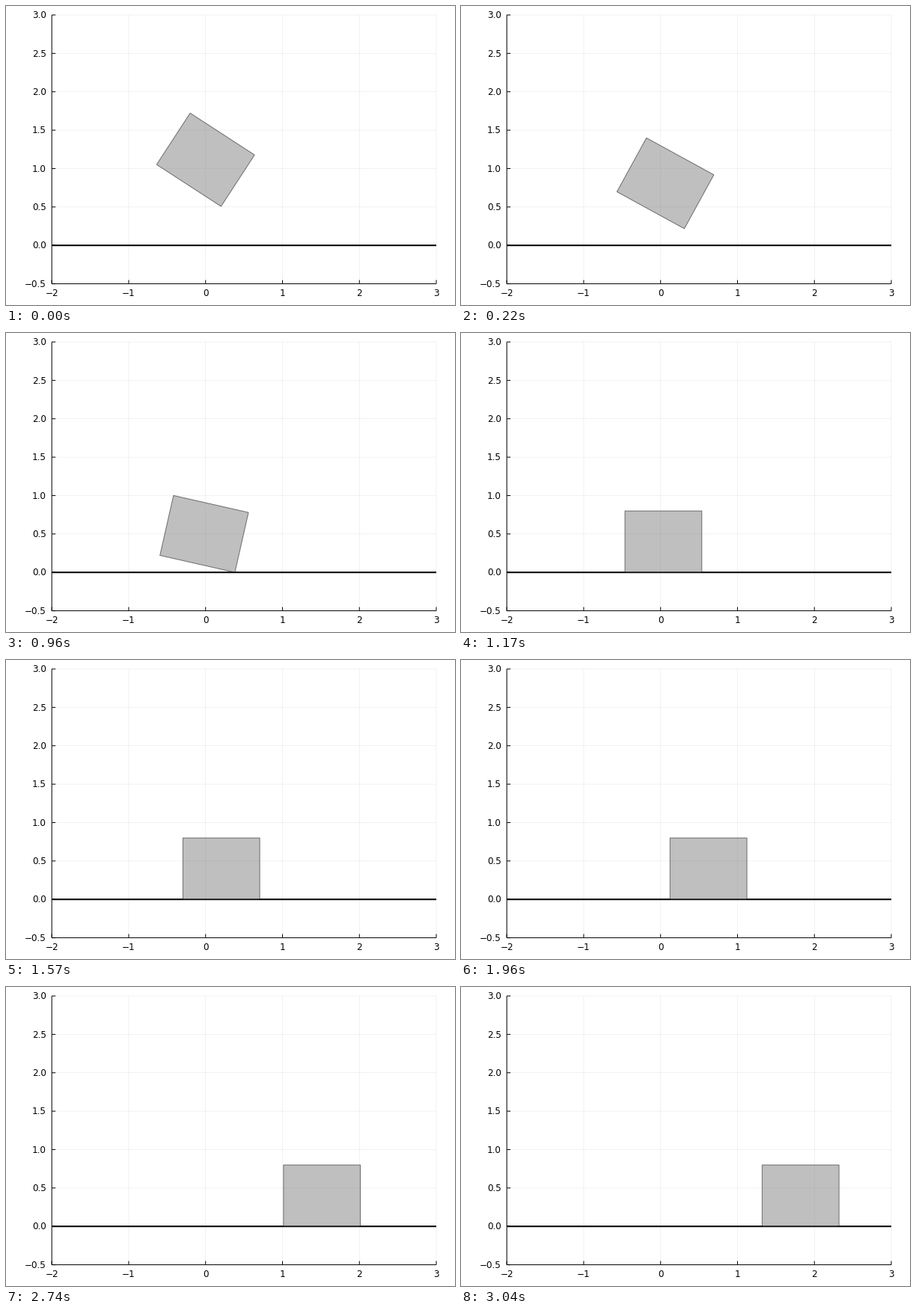
Write a matplotlib script that moves like this. It is 600 by 400 pixels and loops after 3080 ms.

```python
import numpy as np
import matplotlib.pyplot as plt
from matplotlib.animation import FuncAnimation

STAGE_W, STAGE_H, DPI = 600, 400, 100
LEFT, RIGHT, TOP, BOTTOM = 61.2, 575.0, 12.0, 371.6
TICK_MS, LOOP_TICKS = 10, 308
POSES, FPS = 71, 23
PX = 72 / DPI  # one pixel in points

BOX_W, BOX_H = 1.0, 0.8
START_Y, GRAVITY, STEP = 1.115, 9.81, 0.05
START_TILT, IMPACT_TILT, SLIP_TILT = 33.05, 27.0, 15.8
IMPACT, PIVOT, SLIP, REST, FLAT, SLIDE = 7, 8, 14, 16, 26.4, 30
CORNER_X, SLIP_LENGTH = 0.363, 0.173
SPEED, LAG, SLIDE_END = 0.0496, 0.16, 69.2


def progress(pose, start, end):
    return np.clip((pose - start) / (end - start), 0, 1)


def tilt_degrees(pose):
    """Slow turn in the fall, pivot on the stuck corner, then an easing slip."""
    if pose <= PIVOT:
        return START_TILT + (IMPACT_TILT - START_TILT) * progress(pose, 0, IMPACT)
    if pose <= REST:
        turned = progress(pose, PIVOT, SLIP) ** 1.08
        return IMPACT_TILT + (SLIP_TILT - IMPACT_TILT) * turned
    return SLIP_TILT * (1 - progress(pose, REST, FLAT) ** 3)


def box_pose(pose):
    """Centre x, centre y and clockwise tilt of the box."""
    degrees = tilt_degrees(pose)
    tilt = np.radians(degrees)
    reach = BOX_W / 2 * np.cos(tilt) - BOX_H / 2 * np.sin(tilt)
    y = BOX_W / 2 * np.sin(tilt) + BOX_H / 2 * np.cos(tilt)
    if pose < IMPACT:
        x = 0.087 * pose / IMPACT
        y = max(y, START_Y - GRAVITY * (pose * STEP) ** 2 / 2)
    else:
        slipped = max(0, 1 - degrees / SLIP_TILT) ** 1.37
        x = CORNER_X + SLIP_LENGTH * slipped - reach
    n = max(0, min(pose, SLIDE_END) - SLIDE)
    x += SPEED * n - LAG * (1 - np.exp(-n / 3.65))
    return x, y, tilt


def box_corners(pose):
    x, y, tilt = box_pose(pose)
    c, s = np.cos(tilt), np.sin(tilt)
    local = np.array([(-1, -1), (1, -1), (1, 1), (-1, 1)]) * (BOX_W / 2, BOX_H / 2)
    return local @ np.array([(c, -s), (s, c)]) + (x, y)


fig = plt.figure(figsize=(STAGE_W / DPI, STAGE_H / DPI), dpi=DPI, facecolor="white")
ax = fig.add_axes([LEFT / STAGE_W, 1 - BOTTOM / STAGE_H,
                   (RIGHT - LEFT) / STAGE_W, (BOTTOM - TOP) / STAGE_H])
ax.set(xlim=(-2, 3), ylim=(-0.5, 3))
ax.axis("off")

xticks, yticks = np.arange(-2, 4), np.arange(-0.5, 3.1, 0.5)
unit = (RIGHT - LEFT) / 5
tick = 5 / unit
grid = dict(color="black", alpha=0.1, lw=0.5 * PX, snap=False, clip_on=False, zorder=1)
axis = dict(color="black", lw=PX, snap=False, clip_on=False, zorder=2)

ax.vlines(xticks, -0.5, 3, **grid)
ax.hlines(yticks, -2, 3, **grid)
ax.vlines(xticks, -0.5, -0.5 + tick, **axis)
ax.hlines(yticks, -2, -2 + tick, **axis)
ax.vlines(-2, -0.5, 3, **axis)
ax.hlines(-0.5, -2, 3, **axis)

font = dict(family="DejaVu Sans", fontsize=12 * PX, color="black", va="center_baseline")
for v in xticks:
    ax.text(v, -0.5 - 11 / unit, f"{v}".replace("-", "\u2212"), ha="center", **font)
for v in yticks:
    ax.text(-2 - 7.6 / unit, v + 0.8 / unit, f"{v:.1f}".replace("-", "\u2212"),
            ha="right", **font)

ax.plot([-2, 3], [0, 0], color="black", lw=2 * PX, snap=False,
        solid_capstyle="butt", zorder=3)
box = plt.Polygon(box_corners(0), facecolor=(0.5, 0.5, 0.5, 0.5),
                  edgecolor=(0, 0, 0, 0.5), lw=PX, snap=False, zorder=4)
ax.add_patch(box)

pose_starts = np.round(np.arange(POSES) * 1000 / FPS / TICK_MS)


def update(i):
    pose = int(np.searchsorted(pose_starts, i, side="right")) - 1
    box.set_xy(box_corners(pose))
    return (box,)


anim = FuncAnimation(fig, update, frames=LOOP_TICKS, interval=TICK_MS,
                     repeat=True, repeat_delay=0)
plt.show()
```
